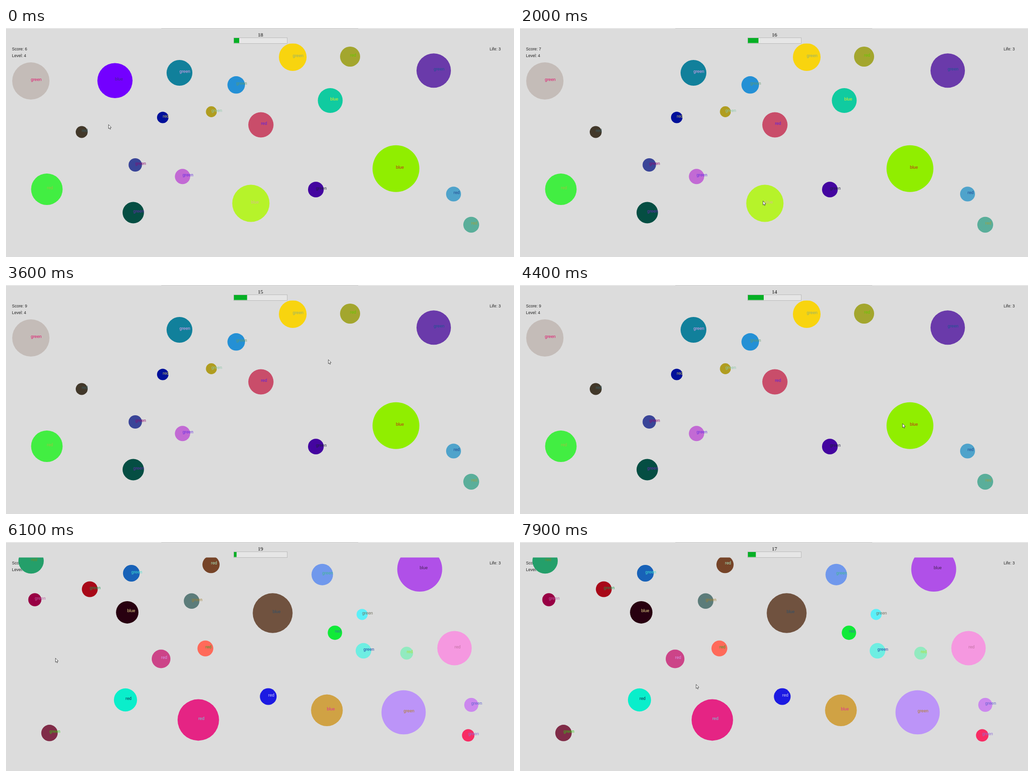
These frames come from a looping animation (1063 by 480 pixels, 8 s). An HTML page with a canvas:

```html
<!DOCTYPE html>
<html lang="en">
<head>
<meta charset="utf-8">
<title>Ball game</title>
<style>
  html, body { margin: 0; width: 100%; height: 100%; overflow: hidden; background: #dcdcdc; }
  canvas { display: block; }
</style>
</head>
<body>
<canvas id="stage" width="1063" height="480"></canvas>
<script>
const ctx = document.getElementById('stage').getContext('2d');
const LOOP = 8000, STEP = 100, NEXT_LEVEL = 4700, FIRST_TICK = 5700;
const SANS = '"Liberation Sans", Arial, sans-serif';
const SERIF = '"Liberation Serif", "Times New Roman", serif';

// x, y, radius, word, fill, ink, time of the click that removes it
const levelFour = [
  [52, 111, 39, 'green', '#c4bcb8', '#e0116b'],
  [228, 110.3, 36.8, 'blue', '#7300ff', '#40208c', 600],
  [363, 94, 27, 'green', '#11809b', '#e8a0f0'],
  [481.7, 119.3, 18.3, 'green', '#2490d5', '#5d9a70'],
  [600, 61, 29, 'green', '#f8d40f', '#8fb070'],
  [720, 60, 21, 'red', '#a3a62e', '#64c800'],
  [895, 89.3, 36, 'green', '#6a3aaa', '#1a5590'],
  [678.5, 152, 26, 'blue', '#10cba0', '#e8f020', 3600],
  [328, 187.5, 12, 'red', '#00109a', '#c8c060'],
  [429.7, 175.5, 11.4, 'green', '#b09d20', '#8cc8a8'],
  [533.4, 203, 26.4, 'red', '#c94d6a', '#5a20e0'],
  [158.4, 218, 12.5, 'red', '#42382a', '#3a6068'],
  [270.5, 287, 14, 'green', '#3a4598', '#8a0a70'],
  [369.4, 311.3, 16, 'green', '#c26ad4', '#6a30e0'],
  [85.5, 338, 33, 'red', '#42ee42', '#a0c040'],
  [266.3, 387, 22.4, 'green', '#054e43', '#6a28b0'],
  [512.4, 367.5, 39, 'blue', '#b6f32a', '#d8b890', 2100],
  [648.4, 338.7, 16.4, 'green', '#4405a0', '#202040'],
  [816, 294.7, 49, 'blue', '#90ee00', '#c02818'],
  [936.5, 348, 15.6, 'red', '#4fa3cb', '#204890'],
  [973.5, 412.3, 16.6, 'red', '#5aae9a', '#a0a040']
];
const levelFive = [
  [52.5, 39.7, 26.5, 'red', '#249f6a', '#7a8a20'],
  [262.3, 65.5, 17.5, 'green', '#1862b8', '#40e0d0'],
  [429, 47.3, 18, 'red', '#764428', '#a8e8c0'],
  [661.8, 68.3, 22.5, 'green', '#7098ec', '#40b890'],
  [865.7, 57, 47, 'blue', '#b050e8', '#402050'],
  [175.3, 99, 16.6, 'green', '#a80818', '#1a9a50'],
  [60.3, 121, 13.7, 'green', '#980044', '#b860a0'],
  [388.4, 123.7, 16.3, 'green', '#5c7c7a', '#a08030'],
  [253.7, 147.4, 23.5, 'blue', '#280010', '#f0e090'],
  [558, 149, 41.7, 'blue', '#70523f', '#305068'],
  [745.2, 151.8, 11.6, 'green', '#5cf0f8', '#707060'],
  [688.3, 190.2, 15, 'red', '#10ea38', '#3870a0'],
  [109.3, 244.2, 51.2, 'blue', '#25405a', '#602030', 5900],
  [324.5, 245, 19.6, 'red', '#cc4488', '#d898e8'],
  [417.2, 223.2, 16.6, 'red', '#ff6a5a', '#30a030'],
  [748, 228, 16.3, 'green', '#6eeee2', '#1a40a0'],
  [838.4, 233, 13.4, 'red', '#92eac0', '#b0e030'],
  [938.5, 222.5, 36, 'red', '#f598e0', '#c070a0'],
  [250, 331, 24.2, 'red', '#0aeecb', '#0a3050'],
  [402.4, 373, 43.4, 'red', '#e52484', '#70d0d8'],
  [548.8, 324, 17.5, 'red', '#1c1ae2', '#d0d0f8'],
  [671.5, 352.8, 33.2, 'blue', '#d0a244', '#e03090'],
  [832, 357, 46.3, 'green', '#bc94f8', '#b08020'],
  [973.6, 341.4, 14.7, 'green', '#cc88ee', '#6060d0'],
  [91, 400.3, 17.2, 'green', '#802c48', '#30d010'],
  [967.2, 405.3, 13, 'green', '#f82c64', '#9070d8']
];

// time, x, y of the pointer tip
const pointerPath = [
  [0, 214, 202], [500, 228, 122], [700, 228, 122], [1100, 242, 143],
  [1400, 262, 175], [1500, 262, 175], [2000, 508, 362], [2500, 508, 362],
  [2800, 607, 150], [3300, 674, 156], [3700, 674, 156], [4400, 800, 290],
  [4700, 800, 290], [5100, 494, 403], [5300, 494, 403], [5800, 103, 243],
  [6300, 103, 243], [7300, 330, 270], [7400, 330, 270], [7800, 368, 298],
  [LOOP, 368, 298]
];

function pointerAt(t) {
  const i = pointerPath.findIndex(([time]) => time > t);
  const [t0, x0, y0] = pointerPath[i - 1], [t1, x1, y1] = pointerPath[i];
  const u = (t - t0) / (t1 - t0), eased = u * u * (3 - 2 * u);
  return [x0 + (x1 - x0) * eased, y0 + (y1 - y0) * eased];
}

function counterAt(t) {
  if (t < FIRST_TICK) return Math.max(14, 18 - Math.floor((t + 100) / 1000));
  return 19 - Math.floor((t - FIRST_TICK) / 1000);
}

function scoreAt(t) {
  const popped = [...levelFour, ...levelFive].filter(ball => ball[6] <= t).length;
  return 6 + popped + (t >= NEXT_LEVEL ? 1 : 0);
}

function rect(color, x, y, w, h) {
  ctx.fillStyle = color;
  ctx.fillRect(x, y, w, h);
}

function text(string, x, y, color, font, align = 'left') {
  ctx.font = font;
  ctx.fillStyle = color;
  ctx.textAlign = align;
  ctx.fillText(string, x, y);
}

function drawBall([x, y, radius, word, fill, ink]) {
  ctx.fillStyle = fill;
  ctx.beginPath();
  ctx.arc(x, y, radius, 0, Math.PI * 2);
  ctx.fill();
  text(word, x, y, ink, `8.8px ${SANS}`);
}

function drawTimer(count) {
  text(count, 532.5, 17.5, '#000', `11px ${SERIF}`, 'center');
  rect('#bcbcbc', 476, 20, 113, 13);
  rect('#e6e6e6', 477, 21, 111, 11);
  rect('#06b025', 477, 21, (20 - count) * 5.5, 10.5);
}

function drawPointer(x, y) {
  ctx.save();
  ctx.translate(x + 0.5, y + 0.5);
  ctx.beginPath();
  for (const [px, py] of [[0, 0], [0, 8.5], [1.9, 6.8], [3.2, 9.7], [4.5, 9.1], [3.3, 6.3], [5.9, 6.1]])
    ctx.lineTo(px, py);
  ctx.closePath();
  ctx.fillStyle = '#fff';
  ctx.strokeStyle = '#333';
  ctx.lineWidth = 0.8;
  ctx.fill();
  ctx.stroke();
  ctx.restore();
}

function draw(t) {
  const second = t >= NEXT_LEVEL, hud = `8.5px ${SANS}`;
  rect('#dcdcdc', 0, 0, 1063, 480);
  rect('#f2f2f2', 0, 0, 1063, 1);
  rect('#d2d2d2', 325, 0, 412, 1);
  drawTimer(counterAt(t));
  text(`Score: ${scoreAt(t)}`, 12.5, 46.7, '#222', hud);
  text(`Level: ${second ? 5 : 4}`, 12.5, 60.7, '#222', hud);
  text('Life: 3', 1012, 46.7, '#222', hud);

  ctx.save();
  ctx.beginPath();
  ctx.rect(0, 32.5, 1063, 448);
  ctx.clip();
  for (const ball of second ? levelFive : levelFour)
    if (t < (ball[6] ?? LOOP)) drawBall(ball);
  ctx.restore();

  drawPointer(...pointerAt(t));
}

function tick() {
  const t = performance.now() % LOOP;
  draw(Math.floor(t / STEP) * STEP);
  requestAnimationFrame(tick);
}
tick();
</script>
</body>
</html>
```
